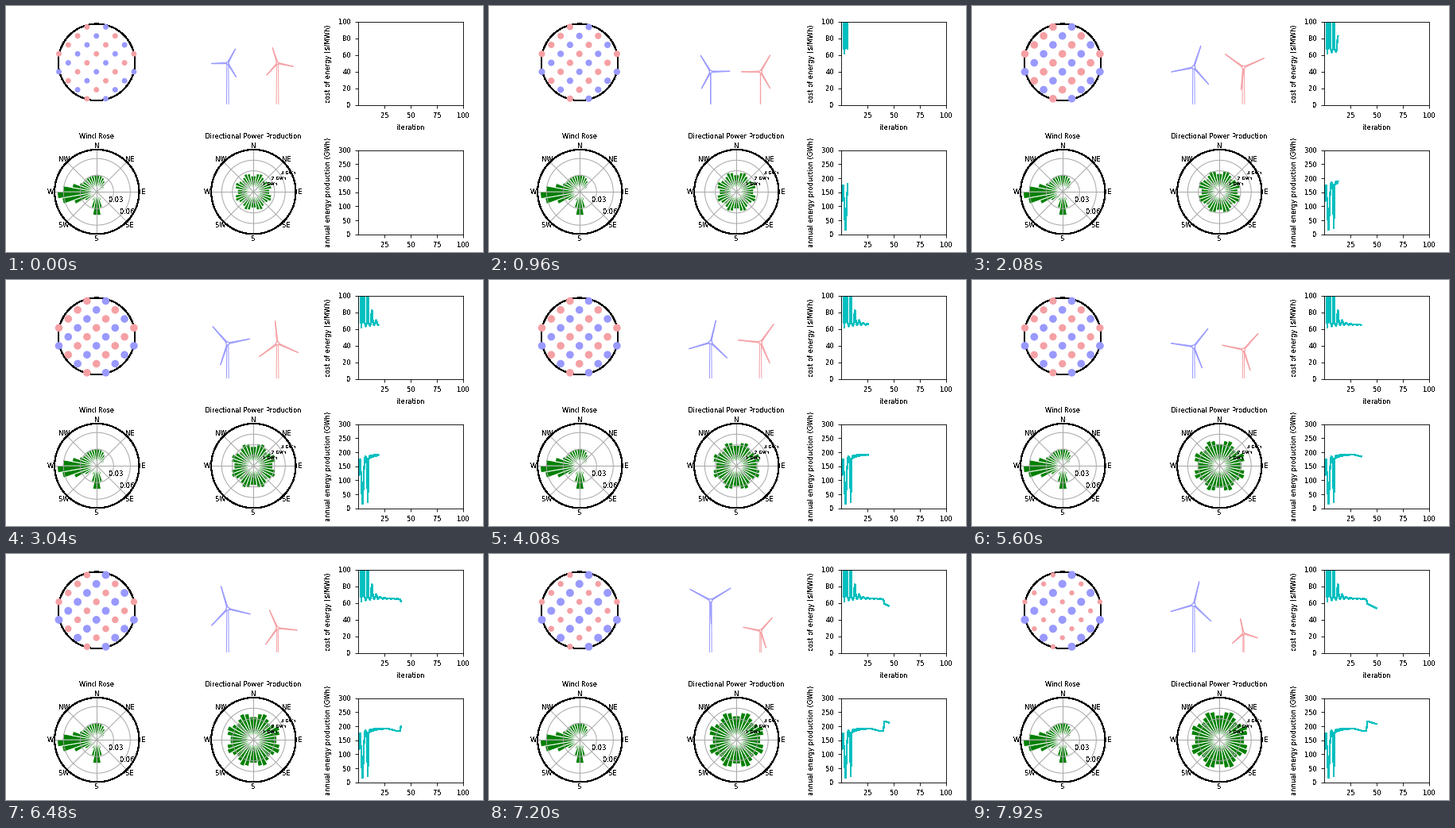
Write a matplotlib script that moves like this. It is 600x310 px and loops after 8000 ms.

```python
import numpy as np
import matplotlib.pyplot as plt
from matplotlib.animation import FuncAnimation
from matplotlib.patches import Circle, Polygon, Wedge

W, H, DPI = 600, 310, 50
FRAMES, INTERVAL = 100, 80
PX = 72 / DPI  # points per pixel
BLUE, RED, CYAN, GREEN, GRID = "#9999ff", "#f5a0a4", "#00bfbf", "#008000", "#a8a8a8"
plt.rcParams.update({"font.family": "DejaVu Sans", "font.size": 12,
                     "text.antialiased": False})

fig = plt.figure(figsize=(W / DPI, H / DPI), dpi=DPI, facecolor="white")
stage = fig.add_axes([0, 0, 1, 1])
stage.set(xlim=(0, W), ylim=(H, 0))
stage.axis("off")


def label(x, y, text, **kw):
    style = dict(ha="center", va="center", zorder=5)
    return stage.text(x, y, text, **{**style, **kw})


def ring(center, radius, color, width=1.0, **kw):
    stage.add_patch(Circle(center, radius, fill=False, ec=color, lw=width * PX, **kw))


def design(color, n):
    """Rotor radius, hub height and tower half width at frame n."""
    split = max(0, (n - 60) / 39)  # the two types grow apart late in the search
    rotor = 20.5 + 8 * min(n / 26, 1)
    hub = 79 - 7 * np.cos(np.pi * n / 12) * np.exp(-n / 20)
    half = 1.4 - 1.2 * np.exp(-((n - 12) / 6) ** 2)
    if color == BLUE:
        return rotor + 1.5 * split, hub - 15 * split + 9 * np.sin(2 * np.pi * split), half
    return rotor - 9.6 * split ** 1.6, hub + 21 * split ** .62, half * (1 - .5 * split)


# Farm layout
FARM = (114, 70.8)
ring(FARM, 48.3, "black", 1.1, zorder=1, antialiased=False)
dots = []
for row, (count, first) in enumerate(zip([2, 3, 4, 5, 4, 5, 4, 3, 2], "RRRRBBRBR")):
    for k in range(count):
        color = RED if (first == "R") == (k % 2 == 0) else BLUE
        x = 113.7 + (k - (count - 1) / 2) * 23.6
        dot = Circle((x, 26.4 + row * 11.3), 3.5, fc=color, ec="none", zorder=2)
        dots.append((stage.add_patch(dot), color))


class Turbine:
    GROUND = 124

    def __init__(self, x, color, phase, speed):
        self.x, self.color, self.phase, self.speed = x, color, phase, speed
        self.tower = stage.add_patch(Polygon([(x, 0), (x, 1), (x, 2)], closed=False,
                                             fill=False, ec=color, lw=1 * PX))
        self.blades = [stage.add_patch(Polygon([(x, 0), (x, 1), (x, 2)], fc=color,
                                               ec=color, lw=.8 * PX)) for _ in range(3)]
        self.hub = stage.add_patch(Circle((x, 0), 2, fc="white", ec=color,
                                          lw=1.2 * PX, zorder=3))

    def update(self, n):
        radius, hub_y, half = design(self.color, n)
        x, ground, top = self.x, self.GROUND, half * .75
        self.tower.set_xy([(x - half, ground), (x - top, hub_y),
                           (x + top, hub_y), (x + half, ground)])
        self.hub.center = (x, hub_y)
        self.hub.set_radius(radius * .07)
        along = radius * np.array([.07, 1, 1, .07])
        across = np.array([.8, .3, -.3, -.8])
        for k, blade in enumerate(self.blades):
            a = np.radians(self.phase + self.speed * n + 120 * k)
            c, s = np.cos(a), np.sin(a)
            blade.set_xy(np.column_stack([x + along * c - across * s,
                                          hub_y - along * s - across * c]))


turbines = [Turbine(278.8, BLUE, 61.5, 5), Turbine(341.5, RED, 108, 6)]

# Roses
BEARINGS = np.arange(5, 360, 10)
ROSE_Y, ROSE_R = 234.2, 53.2


def rose(cx, title, rings):
    label(cx, 164.5, title)
    for r in rings:
        ring((cx, ROSE_Y), r, GRID, zorder=2)
    for k, name in enumerate(["N", "NE", "E", "SE", "S", "SW", "W", "NW"]):
        dx, dy = np.sin(k * np.pi / 4), -np.cos(k * np.pi / 4)
        stage.plot([cx, cx + ROSE_R * dx], [ROSE_Y, ROSE_Y + ROSE_R * dy],
                   color=GRID, lw=PX, zorder=2)
        label(cx + 58.4 * dx, ROSE_Y + .6 + 58.4 * dy, name)
    ring((cx, ROSE_Y), ROSE_R, "black", 1.1, zorder=3, antialiased=False)
    return [stage.add_patch(Wedge((cx, ROSE_Y), 1, b - 95, b - 85, fc=GREEN,
                                  ec="white", lw=PX, zorder=1)) for b in BEARINGS]


def lobe(center, height, width):
    away = (BEARINGS - center + 180) % 360 - 180
    return height * np.exp(-(away / width) ** 2 / 2)


wind = 7 + lobe(263, 40, 17) + lobe(180, 24, 14) + lobe(320, 13, 32) + lobe(18, 11, 25)
wind_bars = rose(114.3, "Wind Rose", [21, 42])
for bar, r in zip(wind_bars, wind):
    bar.set_radius(r)
for k in (1, 2):
    d = 21 * k / np.sqrt(2)
    label(114.3 + d, ROSE_Y + d, f"{.03 * k:.2f}", ha="left", va="bottom")

# Wakes cost power where the rows line up with the wind
power = .9 - .1 * np.cos(8 * np.radians(BEARINGS))
power_bars = rose(311.3, "Directional Power Production", [13.3, 26.6, 39.9])
for k in (1, 2, 3):
    label(311.3 + 11.5 * k, ROSE_Y - 6.9 * k, f"{k} GWh", ha="left", va="bottom",
          fontsize=8)

# Convergence histories: wild early swings, a plateau, then a late improvement
step = np.arange(FRAMES)
it = step / 2
flip = step % 2
swing = np.sin(np.pi * it / 2)
late = np.clip(it - 40, 0, 1)

cost = (68 - .08 * it - 8 * np.exp(-it / 12) * np.maximum(-swing, 0)
        + 1200 * np.exp(-it / 3) * np.maximum(swing, 0)
        + 300 * flip * np.exp(-it / 1.2)
        - 5.5 * late - .55 * np.maximum(it - 41, 0))
energy = (192 - 20 * np.exp(-it / 6) - 60 * flip * np.exp(-it / 6)
          - 165 * np.exp(-(it - 4) ** 2) - 165 * np.exp(-((it - 9) / .6) ** 2)
          - 8 * np.clip((it - 28) / 8, 0, 1)
          + 34 * late - 1.1 * np.maximum(it - 41, 0))


def graph(top, bottom, ymax, gap, ylabel):
    left, right = 443.2, 575.2
    ax = fig.add_axes([left / W, 1 - bottom / H, (right - left) / W, (bottom - top) / H])
    ax.set(xlim=(0, 100), ylim=(0, ymax), xticks=range(25, 101, 25),
           yticks=range(0, ymax + 1, gap))
    ax.tick_params(length=6, width=1.25, pad=7)
    for spine in ax.spines.values():
        spine.set_linewidth(1.25)
    label(406, (top + bottom) / 2, ylabel, rotation=90)
    return ax.plot([], [], color=CYAN, lw=1.2 * PX, antialiased=False)[0]


cost_line = graph(19.8, 124.8, 100, 20, "cost of energy ($/MWh)")
energy_line = graph(181.8, 287.8, 300, 50, "annual energy production (GWh)")
label(509, 153, "iteration")


def update(n):
    for line, values in ((cost_line, cost), (energy_line, energy)):
        line.set_data(it[:n + 1], values[:n + 1])
    for dot, color in dots:
        dot.set_radius(design(color, n)[0] * .168)
    for turbine in turbines:
        turbine.update(n)
    size = 24.5 + 13.5 * n / (FRAMES - 1)
    for bar, share in zip(power_bars, power):
        bar.set_radius(size * share)
    return []


anim = FuncAnimation(fig, update, frames=FRAMES, interval=INTERVAL, repeat=True,
                     repeat_delay=0, init_func=lambda: update(0))
plt.show()
```
